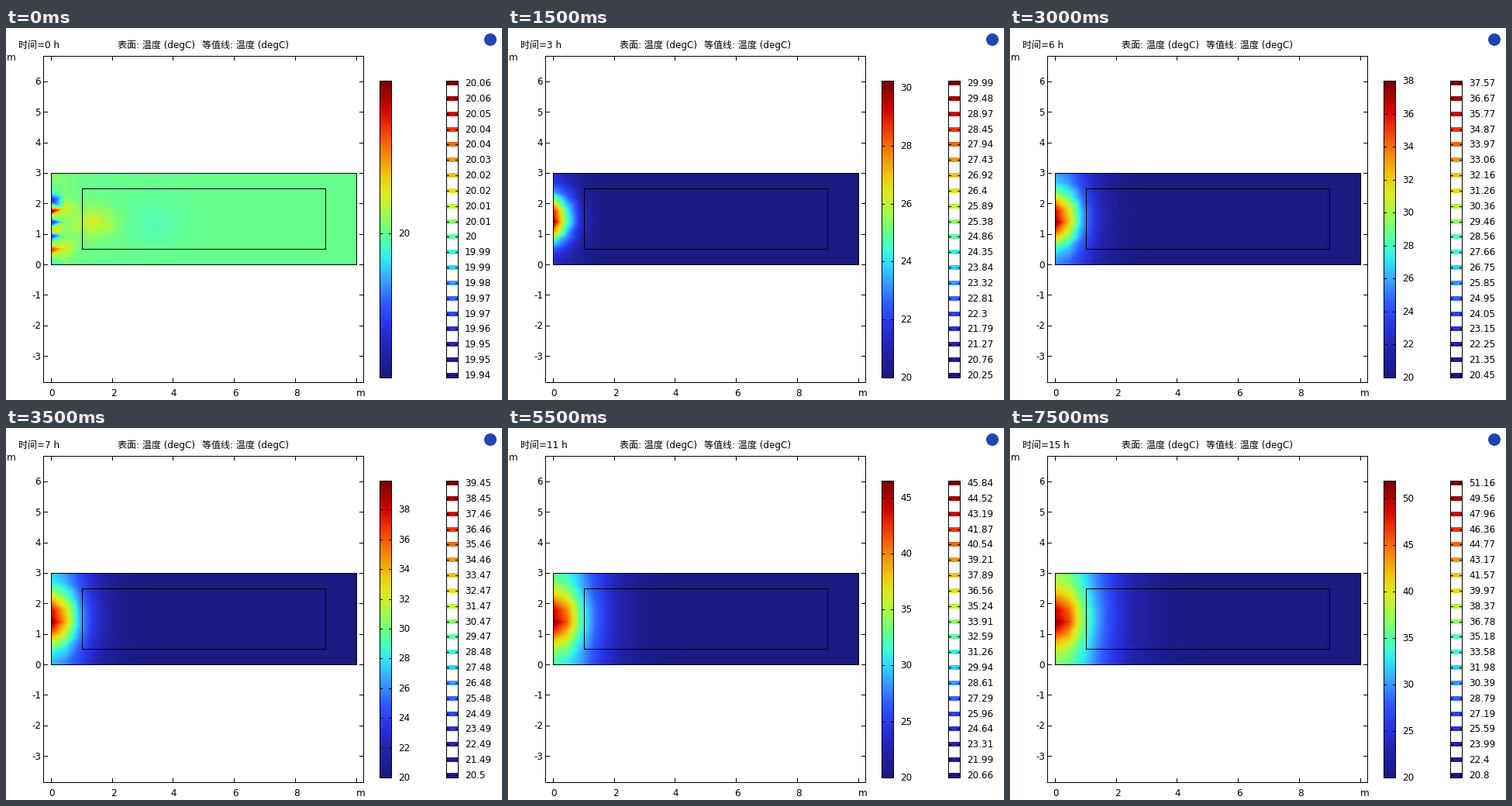
These frames come from a looping animation (640 by 480 pixels, 8 s). A matplotlib script:

```python
import numpy as np
import matplotlib.pyplot as plt
from matplotlib.animation import FuncAnimation
from matplotlib.colors import LinearSegmentedColormap
from matplotlib.patches import Circle, Rectangle
from matplotlib.tri import LinearTriInterpolator, Triangulation

plt.rcParams["font.family"] = ["DejaVu Sans", "Noto Sans CJK JP"]

PX = 0.72                 # one pixel in points at 100 dpi
HOURS = 16
X0, Y0, UNIT = 58.5, 305.5, 39.35
BAR_TOP, BAR_BOTTOM = 68, 451

# Temperature range per hour
HIGH = [20.0669, 22.95995, 26.75, 30.25, 33.3515, 35.8, 38.0224, 39.95,
        41.74, 43.394, 44.99, 46.5034, 47.96, 49.35, 50.67, 51.955]
LOW = np.interp(range(HOURS), [0, 1, 4, 6, 9],
                [19.9369, 19.98595, 19.9915, 19.9944, 20])

RAINBOW = LinearSegmentedColormap.from_list("rainbow", [
    (0.00, "#1a1a80"), (0.10, "#2323b0"), (0.18, "#2a36e6"),
    (0.25, "#2f5aff"), (0.33, "#3ca4ff"), (0.39, "#2ee2fa"),
    (0.44, "#46fdcc"), (0.49, "#68ff8e"), (0.55, "#a0fc50"),
    (0.62, "#dcec1e"), (0.68, "#f0c80c"), (0.76, "#f48408"),
    (0.84, "#f03804"), (0.90, "#d60800"), (1.00, "#780000")], N=512)


# ---- heat field on a coarse mesh ----
def build_mesh():
    wall = [0, 0.25, 0.5, 0.72, 0.95, 1.15, 1.4, 1.58, 1.75, 1.93, 2.1, 2.4, 2.7, 3]
    nodes = [(0, y) for y in wall]
    for i, x in enumerate(np.linspace(0, 10, 23)[1:]):
        if i % 2:
            column = np.linspace(0, 3, 8)
        else:
            column = np.r_[0, 0.11 + 0.43 * np.arange(7), 3]
        nodes += [(x, y) for y in column]
    return np.array(nodes).T


def diffuse(x, y, hour, rate=0.12, center=1.52, width=0.45):
    """Heat from a zone behind the left wall of an insulated strip, as a cosine series."""
    depth = 0.52 * (1 - np.exp(-hour / 5))
    # substituting s = p**2 removes the singularity at s = 0
    p = (np.arange(300) + 0.5) / 300 * np.sqrt(hour)
    spread = 4 * rate * p ** 2
    offsets = depth * np.linspace(-1, 1, 12)
    plume = np.mean([np.exp(-(x[:, None] - a) ** 2 / spread) for a in offsets], axis=0)
    total = np.zeros_like(x)
    for n in range(9):
        k = n * np.pi / 3
        weight = (2 if n else 1) * np.exp(-(k * width) ** 2 / 2) * np.cos(k * center)
        total += weight * np.cos(k * y) * (plume * np.exp(-rate * k * k * p ** 2)).mean(axis=1)
    return total


def initial_field(x, y):
    spots = [(0, 0.02, -0.13), (0, 0.5, 0.36), (0, 0.95, -0.38), (0, 1.15, 0.16),
             (0, 1.4, -0.42), (0, 1.75, 0.5), (0, 2.1, -0.4), (0, 2.4, -0.06),
             (0.45, 0.5, 0.12), (0.45, 1.8, 0.1)]
    field = np.full_like(x, 0.49)
    for sx, sy, amount in spots:
        field += amount * np.exp(-((x - sx) / 0.2) ** 2 - ((y - sy) / 0.1) ** 2)
    field += 0.13 * np.exp(-((x - 1.4) / 0.65) ** 2 - ((y - 1.4) / 0.42) ** 2)
    field += 0.03 * np.exp(-(x / 0.7) ** 2)
    field -= 0.03 * np.exp(-((x - 3.4) / 0.9) ** 2 - ((y - 1.4) / 0.7) ** 2)
    return field


def heated_field(x, y, hour):
    field = np.clip(diffuse(x, y, hour), 0, None)
    field = (field / field.max()) ** (1 + np.exp(1 - hour))
    peak = 0.04 + 0.2 * np.exp(-hour)
    field *= 1 + peak * np.exp(-((y - 1.4) / 0.12) ** 2 - (x / 0.5) ** 2)
    field *= 1 - 0.05 * np.exp(-((y - 1.58) / 0.08) ** 2 - (x / 0.2) ** 2)
    return field / field.max()


def render_fields():
    x, y = build_mesh()
    mesh = Triangulation(x, y)
    gx, gy = np.meshgrid((np.arange(395) + 0.5) / 39.5, 3 - (np.arange(119) + 0.5) / 39.67)
    for hour in range(HOURS):
        values = heated_field(x, y, hour) if hour else initial_field(x, y)
        yield LinearTriInterpolator(mesh, values)(gx, gy).filled(0)


FIELDS = list(render_fields())

# ---- stage, laid out on whole pixels ----
fig = plt.figure(figsize=(6.4, 4.8), dpi=100, facecolor="white")
ax = fig.add_axes([0, 0, 1, 1])
ax.set_axis_off()


def label(x, y, text, ha="left"):
    return ax.text(x, round(y + 4), text, fontsize=12 * PX, ha=ha, va="baseline")


def box(left, top, width, height, color="black", z=5):
    return ax.add_patch(Rectangle((left, top), width, height, fc=color, lw=0,
                                  antialiased=False, zorder=z))


def frame(left, top, right, bottom):
    for y in (top, bottom):
        box(left, y, right - left + 1, 1)
    for x in (left, right):
        box(x, top, 1, bottom - top + 1)


def bar_ticks(left, right, y):
    return [box(left, y, 4, 1), box(right - 3, y, 4, 1)]


def number(value):
    return f"{round(value, 2):g}"


def shade(data, left, top, right, bottom):
    return ax.imshow(data, cmap=RAINBOW, vmin=0, vmax=1, aspect="auto",
                     interpolation="nearest", extent=(left, right, bottom, top))


surface = shade(FIELDS[0], 58, 187, 453, 306)
shade(np.linspace(1, 0, 384)[:, None], 482, 68, 498, 452)

frame(48, 36, 461, 457)
frame(58, 187, 452, 305)
frame(98, 207, 412, 285)
frame(482, BAR_TOP, 497, BAR_BOTTOM)
frame(568, BAR_TOP, 583, BAR_BOTTOM)

for v in range(-3, 7):
    y = Y0 - v * UNIT
    box(49, int(y), 5, 1)
    box(456, int(y), 5, 1)
    label(45, y, str(v), "right")
for v in range(0, 11, 2):
    x = int(X0 + v * UNIT)
    box(x, 452, 1, 5)
    box(x, 37, 1, 5)
    if v < 10:
        label(x + 1.5, 471, str(v), "center")
label(452, 471, "m")
label(1, 38, "m")

clock = label(16, 21.5, "")
label(144, 21.5, "表面: 温度 (degC)")
label(253, 21.5, "等值线: 温度 (degC)")
ax.add_patch(Circle((625, 15), 8, fc="#1f45b4", lw=0))

level_labels = []
for k in range(20):
    y = round(448 - k * 377 / 19)
    box(568, y - 3, 15, 6, RAINBOW(k / 19), 3)
    bar_ticks(568, 583, y)
    level_labels.append(label(592, y, ""))

ax.set_xlim(0, 640)
ax.set_ylim(480, 0)
scale_marks = []


def tick_step(span):
    return next(step for limit, step in [(5, 0.5), (8, 1), (20, 2), (99, 5)] if span < limit)


def update(hour):
    low, high = LOW[hour], HIGH[hour]
    surface.set_data(FIELDS[hour])
    clock.set_text(f"时间={hour} h")
    for k, text in enumerate(level_labels):
        text.set_text(number(low + (high - low) * (k + 0.5) / 20))

    while scale_marks:
        scale_marks.pop().remove()
    for v in np.arange(20, high, tick_step(high - low)):
        y = round(BAR_BOTTOM - (v - low) / (high - low) * (BAR_BOTTOM - BAR_TOP))
        scale_marks.extend(bar_ticks(482, 497, y))
        scale_marks.append(label(506, y, number(v)))
    return [surface, clock, *level_labels, *scale_marks]


anim = FuncAnimation(fig, update, frames=HOURS, interval=500, repeat=True,
                     repeat_delay=0, init_func=lambda: update(0), blit=False)
plt.show()
```
